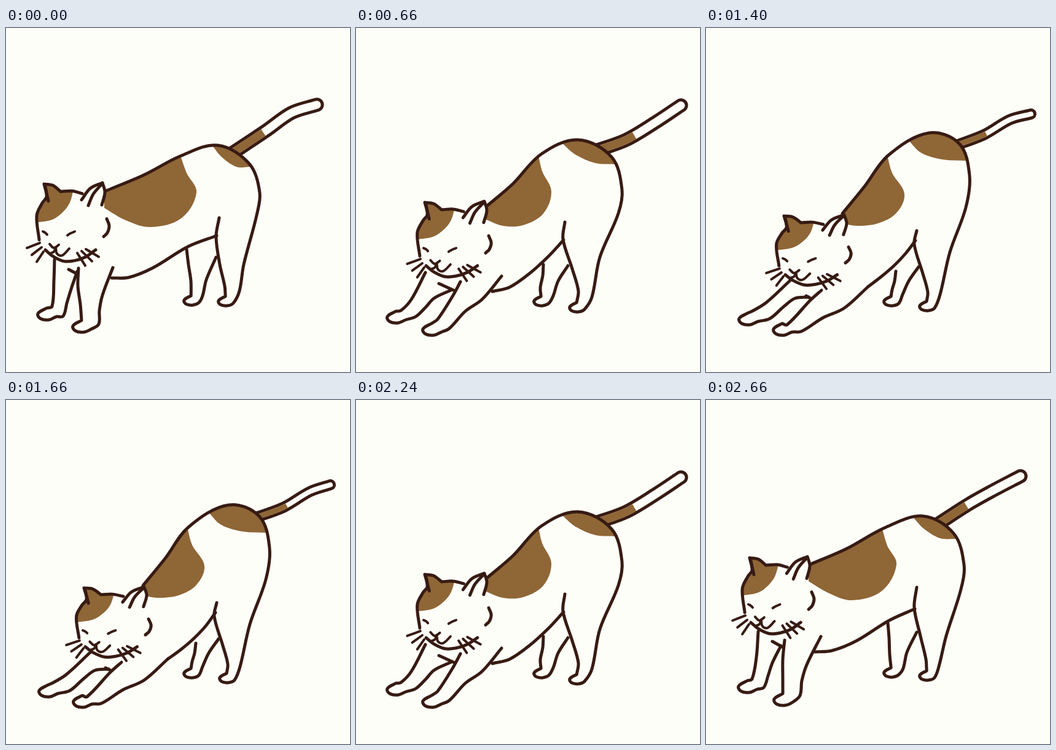
Animation of 560x560 px, one loop 2.82 s. Source, as an HTML page with a canvas:

```html
<!DOCTYPE html>
<html lang="en">
<head>
<meta charset="utf-8">
<title>Stretching cat</title>
<style>
html, body { margin: 0; width: 100%; height: 100%; overflow: hidden; background: #fdfef8; }
canvas { display: block; width: 560px; height: 560px; }
</style>
</head>
<body>
<canvas id="stage" width="560" height="560"></canvas>
<script>
const ctx = document.getElementById('stage').getContext('2d');
const INK = '#371b13', FUR = '#8f6636', PAPER = '#fdfef8', LINE = 5;

// Key points of a pose. Limbs read: front edge | toe | back edge.
// "body" is the near hind leg, whose back edge runs on over the rump to the neck.
const stand = {
  head: '62,254', headSize: '100,103',
  body: '347,309 342,340 348,385 356,420|346,444|380,428 387,385 408,305 413,268 396,221 345,191 285,208 225,239 163,265',
  nearFore: '118,391 117,420 121,450|109,485|151,482 152,460 157,435 174,390',
  farFore: '79,377 78,410 75,453|52,465|93,469 99,448 106,425 116,396',
  farHind: '294,360 297,385 301,412|290,443|320,436 326,410 342,373',
  belly: '172,407 200,406 240,390 296,356 343,338',
  chest: '102,393 117,401',
  spot: '160,293 195,313 235,324 285,310 310,268 294,236 284,208',
  rump: '337,193 350,209 375,226 397,226',
  tail: '368,204 425,166 465,138 506,125', tailSize: '18,61'
};

const reach = {
  head: '85,261', headSize: '98,97',
  body: '338,300 335,335 350,383 362,425|350,453|378,444 396,382 425,312 431,268 414,211 365,187 300,209 236,246 183,269',
  nearFore: '144,391 138,425 132,460|113,489|155,480 163,452 175,425 207,378',
  farFore: '93,377 87,432 74,456|54,468|95,466 103,450 111,432 130,407',
  farHind: '298,368 300,390 296,418|289,444|323,438 328,412 344,385',
  belly: '185,415 212,412 253,394 300,364 335,344',
  chest: '116,394 140,407',
  spot: '178,297 205,315 240,329 288,313 310,268 297,238 292,212',
  rump: '341,194 360,208 390,223 424,225',
  tail: '388,202 430,176 473,161 520,122', tailSize: '19,52'
};

const bow = {
  head: '130,299', headSize: '104,100',
  body: '342,326 339,350 354,398 362,430|347,455|388,434 398,367 429,295 435,260 418,209 358,179 303,203 268,259 235,302',
  nearFore: '187,427 170,445 133,484|106,491|150,495 188,467 225,453 257,422',
  farFore: '127,412 92,448 72,462|49,471|98,472 120,458 138,445 170,440',
  farHind: '309,396 307,412 303,426|290,444|320,434 330,412 346,389',
  belly: '247,439 275,428 302,404 322,378 340,346',
  chest: '148,431 172,441',
  spot: '234,322 262,326 294,315 316,295 323,265 307,230 301,205',
  rump: '333,184 355,205 390,218 424,220',
  tail: '392,199 440,188 489,148 511,93', tailSize: '17,78'
};

const deep = {
  ...bow,
  head: '127,306', headSize: '103,92',
  body: '343,330 339,352 353,400 361,430|348,452|381,434 397,365 423,292 429,240 412,188 362,171 297,207 258,258 222,302',
  nearFore: '188,427 170,443 132,483|110,490|155,494 190,472 225,456 264,421',
  farFore: '137,411 98,447 77,460|54,473|104,473 126,454 145,440 167,438',
  belly: '264,421 285,405 306,387 325,367 341,346',
  chest: '163,436 170,440',
  spot: '222,318 245,322 280,318 310,301 323,270 303,236 295,207',
  rump: '329,182 350,203 385,214 424,216',
  tail: '398,194 452,174 495,149 529,140', tailSize: '13,62'
};

// Head features, measured from the tip of the left ear.
const face = {
  skull: '-8,88 -12,50 -3,30 4,20 0,0|14,2 27,12|45,11 62,15',
  ear: '61,25 75,7 95,-2|99,13 94,33',
  cheek: '102,55 106,66 103,77 97,83',
  chin: '84,104 68,115 50,121 32,122 14,114 2,104',
  folds: ['2,4 4,14 7,27', '72,34 80,16 94,0'],
  mask: '-14,61 14,56 31,44 42,29 48,8',
  marks: ['-2,75 2,77 5,80', '38,81 43,78 50,75', '9,95 16,101 24,96',
    '19,100 16,107 9,110', '19,100 21,110 29,113 41,102']
};
for (let i = 0; i < 3; i++) {
  face.marks.push(`${3 * i - 7},${93 + 7 * i} ${8 * i - 28},${101 + 11 * i}`);
  face.marks.push(`${54 + 7 * i},${109 - 3 * i} ${67 + 11 * i},${129 - 7 * i}`);
}

const PAW = '14,-9 0,0 4,8 18,10 30,5';

// Blend two poses number by number.
function mix(a, b, t, extra) {
  const out = {};
  for (const part in a) {
    const to = b[part].match(/\d+/g);
    let i = 0;
    out[part] = a[part].replace(/\d+/g, n => Math.round(+n + (to[i++] - n) * t));
  }
  return { ...out, ...extra };
}

const lean = mix(stand, reach, 0.4);
const slide = mix(reach, bow, 0.6, { tail: '390,200 440,182 490,152 529,126' });
const sink = mix(reach, bow, 0.85, { tail: '392,199 440,186 490,150 516,117' });
const push = mix(bow, deep, 0.95);

const points = text => text.match(/-?\d+,-?\d+/g).map(p => p.split(',').map(Number));
const runs = text => text.split('|').map(points);

function limb(text, size) {
  const [front, [toe], back] = runs(text);
  const [instep, ...paw] = points(PAW).map(([x, y]) => [toe[0] + x * size, toe[1] + y * size]);
  return [[...front, instep], [...paw, ...back]];
}

function heading(a, b) {
  const x = b[0] - a[0], y = b[1] - a[1], len = Math.hypot(x, y) || 1;
  return [x / len, y / len];
}

// Smooth curve through each run, with a corner where two runs meet.
function smooth(list) {
  const path = new Path2D();
  let last = null;
  for (const run of list) {
    const p = last ? [last, ...run] : run;
    if (!last) path.moveTo(...p[0]);
    for (let i = 0; i < p.length - 1; i++) {
      const b = p[i], c = p[i + 1];
      const u = heading(p[i - 1] || b, c), v = heading(b, p[i + 2] || c);
      const k = Math.hypot(c[0] - b[0], c[1] - b[1]) / 3;
      path.bezierCurveTo(b[0] + u[0] * k, b[1] + u[1] * k, c[0] - v[0] * k, c[1] - v[1] * k, ...c);
    }
    last = p[p.length - 1];
  }
  return path;
}

function fill(path, color = PAPER) {
  ctx.fillStyle = color;
  ctx.fill(path);
}

function ink(list, width = LINE) {
  ctx.lineWidth = width;
  ctx.strokeStyle = INK;
  ctx.stroke(smooth(list));
}

// Colour everything above an edge that lies inside a shape.
function patch(shape, edge) {
  const path = smooth([edge]), first = edge[0], last = edge[edge.length - 1];
  path.lineTo(last[0], last[1] - 90);
  path.lineTo(first[0], first[1] - 90);
  ctx.save();
  ctx.clip(shape);
  fill(path, FUR);
  ctx.restore();
}

function drawTail(cat) {
  const path = smooth(runs(cat.tail));
  const [[width, fur]] = points(cat.tailSize);
  const layer = (w, color) => {
    ctx.lineWidth = w;
    ctx.strokeStyle = color;
    ctx.stroke(path);
  };
  layer(width + LINE, INK);
  layer(width - LINE, PAPER);
  ctx.save();
  ctx.lineCap = 'butt';
  ctx.setLineDash([fur, 999]);
  layer(width - LINE, FUR);
  ctx.restore();
}

function drawHead(cat) {
  const [[x, y]] = points(cat.head), [[sx, sy]] = points(cat.headSize);
  const place = text => runs(text).map(run => run.map(p => [x + p[0] * sx / 100, y + p[1] * sy / 100]));
  const outline = [face.skull, face.ear, face.cheek, face.chin].map(place);
  const shape = smooth(outline.flat());
  fill(shape);
  patch(shape, place(face.mask)[0]);
  outline.forEach(part => ink(part));
  face.folds.forEach(fold => ink(place(fold)));
  face.marks.forEach(mark => ink(place(mark), 4));
}

function draw(cat) {
  ctx.fillStyle = PAPER;
  ctx.fillRect(0, 0, 560, 560);
  ctx.lineCap = ctx.lineJoin = 'round';

  drawTail(cat);
  for (const leg of [limb(cat.farFore, 1), limb(cat.farHind, 0.8)]) {
    fill(smooth(leg));
    ink(leg);
  }

  const body = limb(cat.body, 0.8), fore = limb(cat.nearFore, 1), belly = runs(cat.belly);
  const torso = smooth([...body, ...fore, ...belly]);
  fill(torso);
  patch(torso, points(cat.spot));
  patch(torso, points(cat.rump));
  for (const part of [body, fore, belly, runs(cat.chest)]) ink(part);

  drawHead(cat);
}

const LOOP = 2820;
const cues = [
  [0, stand], [240, lean], [400, reach], [660, slide], [820, sink], [1000, bow], [1240, push],
  [1400, deep], [1660, push], [1820, deep], [2000, bow], [2240, slide], [2400, reach], [2660, lean]
];
const start = performance.now();
let shown = null;

function tick(now) {
  const t = Math.max(0, now - start) % LOOP;
  const pose = cues.filter(c => c[0] <= t).pop()[1];
  if (pose !== shown) draw(shown = pose);
  requestAnimationFrame(tick);
}
tick(start);
</script>
</body>
</html>
```
